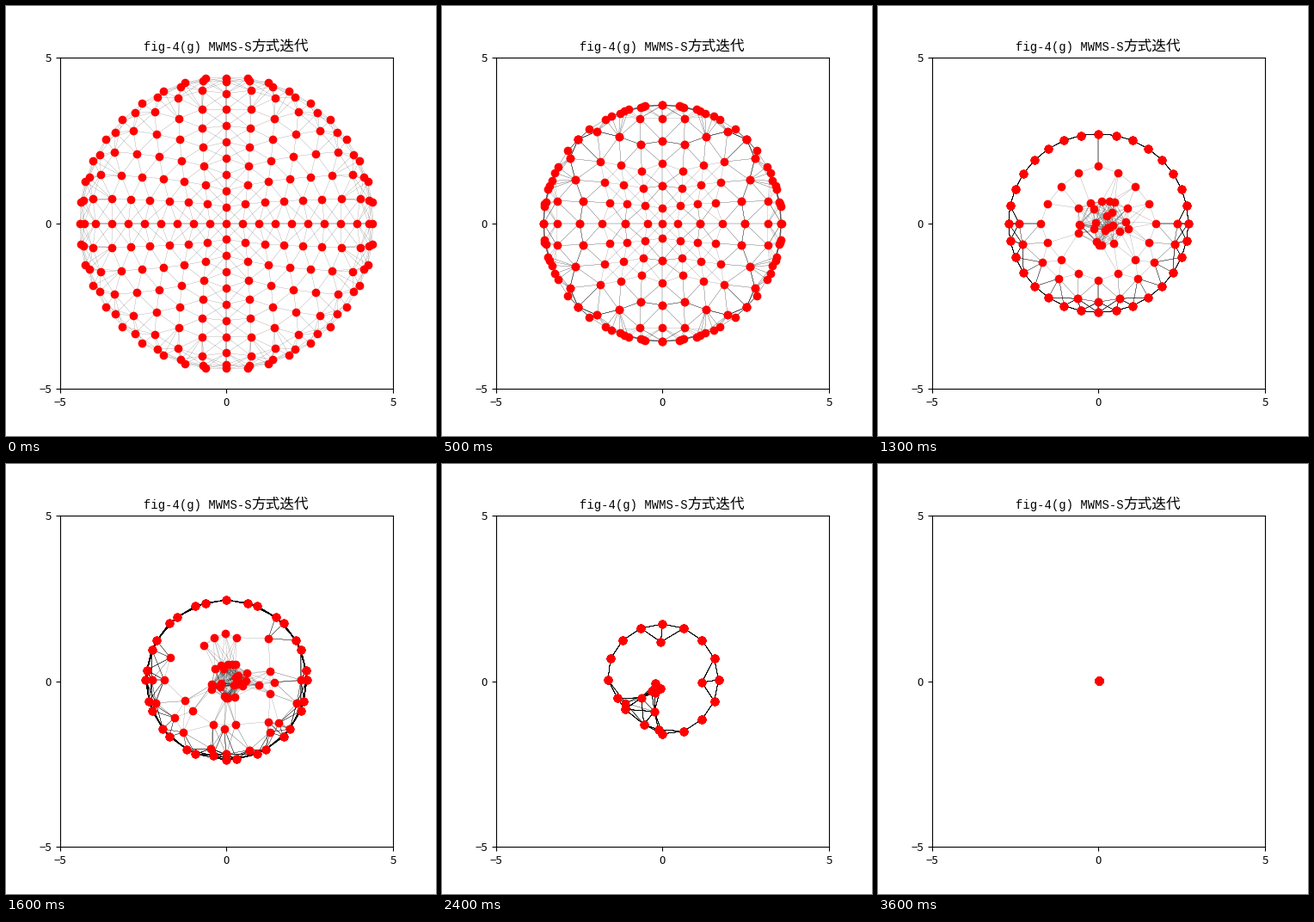
Animation, 500 px wide and 500 px high, one loop 4100 ms. Source, as a matplotlib script:

```python
import numpy as np
import matplotlib.pyplot as plt
from matplotlib.animation import FuncAnimation
from matplotlib.collections import LineCollection

plt.rcParams["font.family"] = "Noto Sans CJK JP"

REACH = 1.0          # agents closer than this are linked
SPAN = 10            # half-diagonal of the diamond lattice
FRAMES, LAST = 41, 36
rng = np.random.default_rng(4)


def radius(p):
    return np.hypot(p[:, 0], p[:, 1])


def polar(r, deg):
    a = np.radians(deg)
    return np.stack([r * np.cos(a), r * np.sin(a)], axis=-1).reshape(-1, 2)


def slots(n):
    return np.arange(n) * 360 / n


def warp(a, b):
    """Lattice indices to positions; rows widen away from the axes."""
    def pitch(k):
        return 0.76 - 0.27 * np.exp(-k / 2.7)
    return np.stack([a * pitch(b), b * pitch(a)], axis=1)


def squeeze(p, limit, soft):
    """Hold points inside a disc with a soft rim."""
    r = radius(p)
    knee = limit - soft
    over = np.maximum(r - knee, 0)
    held = np.minimum(r, knee) + soft * (1 - np.exp(-over / soft))
    return p * (held / np.maximum(r, 1e-9))[:, None]


def fold(k, mate):
    """Merge neighbouring lattice indices: by threes on an axis, else 4 and 5."""
    on_axis = k + 0.5 * (k % 3 == 2) - 0.5 * ((k % 3 == 0) & (k > 0))
    off_axis = np.where((k == 4) | (k == 5), 4.5, k)
    return np.where(mate == 0, on_axis, off_axis)


def nearest(p, nodes):
    gap = p[:, None] - nodes[None]
    return nodes[np.hypot(gap[..., 0], gap[..., 1]).argmin(axis=1)]


def onto_ring(p, mask, r, n):
    q = p.copy()
    q[mask] = nearest(p[mask], polar(r, slots(n)))
    return q


def build_poses():
    axis = np.arange(-SPAN, SPAN + 1)
    i, j = (g.ravel() for g in np.meshgrid(axis, axis))
    keep = abs(i) + abs(j) <= SPAN
    i, j = i[keep], j[keep]
    a, b = abs(i), abs(j)
    sign = np.stack([np.sign(i), np.sign(j)], axis=1)

    start = squeeze(sign * warp(a, b), 4.45, 0.45)
    dense = squeeze(0.92 * sign * warp(fold(a, b), fold(b, a)), 3.58, 0.2)

    # The core loses its symmetry while the rim gathers into even slots.
    p = 0.96 * dense
    core = radius(p) < 1.2
    p[core] = 0.9 * p[core] + (0.06, 0.03) + rng.normal(0, 0.12, (core.sum(), 2))
    rim = onto_ring(p, radius(p) > 2.85, 3.0, 32)

    r = radius(rim)
    swept = (r > 2.45) | ((r > 1.75) & (rim[:, 1] > 0))
    p = np.where((r < 1.3)[:, None], 0.7 * rim + (0.12, 0), rim)
    sparse = onto_ring(p, swept, 2.7, 32)

    # What is left inside lines up on four arms.
    arms = polar(np.array([0.3, 1.05, 1.73])[:, None],
                 np.array([95, -4, 215, 262]))
    rays = np.vstack([polar(2.05, slots(16)) + (0, 0.08), arms])
    spokes = nearest(0.8 * sparse, rays)

    deg = slots(16)
    dent = 0.75 * np.exp(-((deg - 225) / 32) ** 2)
    loop = nearest(0.65 * spokes, polar(1.32 - dent, deg))

    small = loop * (0.722, 0.742) + (0.24, 0.16)
    return {0: start, 5: dense, 9: rim, 13: sparse, 20: spokes, 28: loop,
            30: small, LAST: np.full_like(loop, 0.02)}


poses = build_poses()
steps = list(poses)


def agents(step):
    k = min(np.searchsorted(steps, step, side="right") - 1, len(steps) - 2)
    s0, s1 = steps[k], steps[k + 1]
    u = (step - s0) / (s1 - s0)
    return poses[s0] * (1 - u) + poses[s1] * u


def links(pos):
    """Segments between linked agents, repeated where agents coincide."""
    p, n = np.unique(np.round(pos, 3) + 0.0, axis=0, return_counts=True)
    i, j = np.triu_indices(len(p), 1)
    near = radius(p[i] - p[j]) < REACH
    i, j = i[near], j[near]
    segs = np.stack([p[i], p[j]], axis=1)
    return np.repeat(segs, np.minimum(n[i] * n[j], 30), axis=0)


fig, ax = plt.subplots(figsize=(5, 5), dpi=100)
fig.subplots_adjust(left=0.125, right=0.9, bottom=0.11, top=0.88)
ax.set(xlim=(-5, 5), ylim=(-5, 5), xticks=(-5, 0, 5), yticks=(-5, 0, 5))
ax.tick_params(labelsize=9.5)

# Both halves of the title meet at one point.
seam = dict(x=0.575, y=1.0216, transform=ax.transAxes)
ax.text(s="fig-4(g) MWMS-S", ha="right", family="Liberation Mono", size=10,
        **seam)
ax.text(s="方式迭代", ha="left", size=12, **seam)

edges = LineCollection([], colors="black", linewidths=0.1, zorder=1)
ax.add_collection(edges)
dots, = ax.plot([], [], "ro", markersize=6, zorder=3)


def update(i):
    pos = agents(min(i, LAST))
    edges.set_segments(links(pos))
    dots.set_data(pos[:, 0], pos[:, 1])
    return edges, dots


anim = FuncAnimation(fig, update, frames=FRAMES, interval=100, repeat=True,
                     repeat_delay=0)
plt.show()
```
